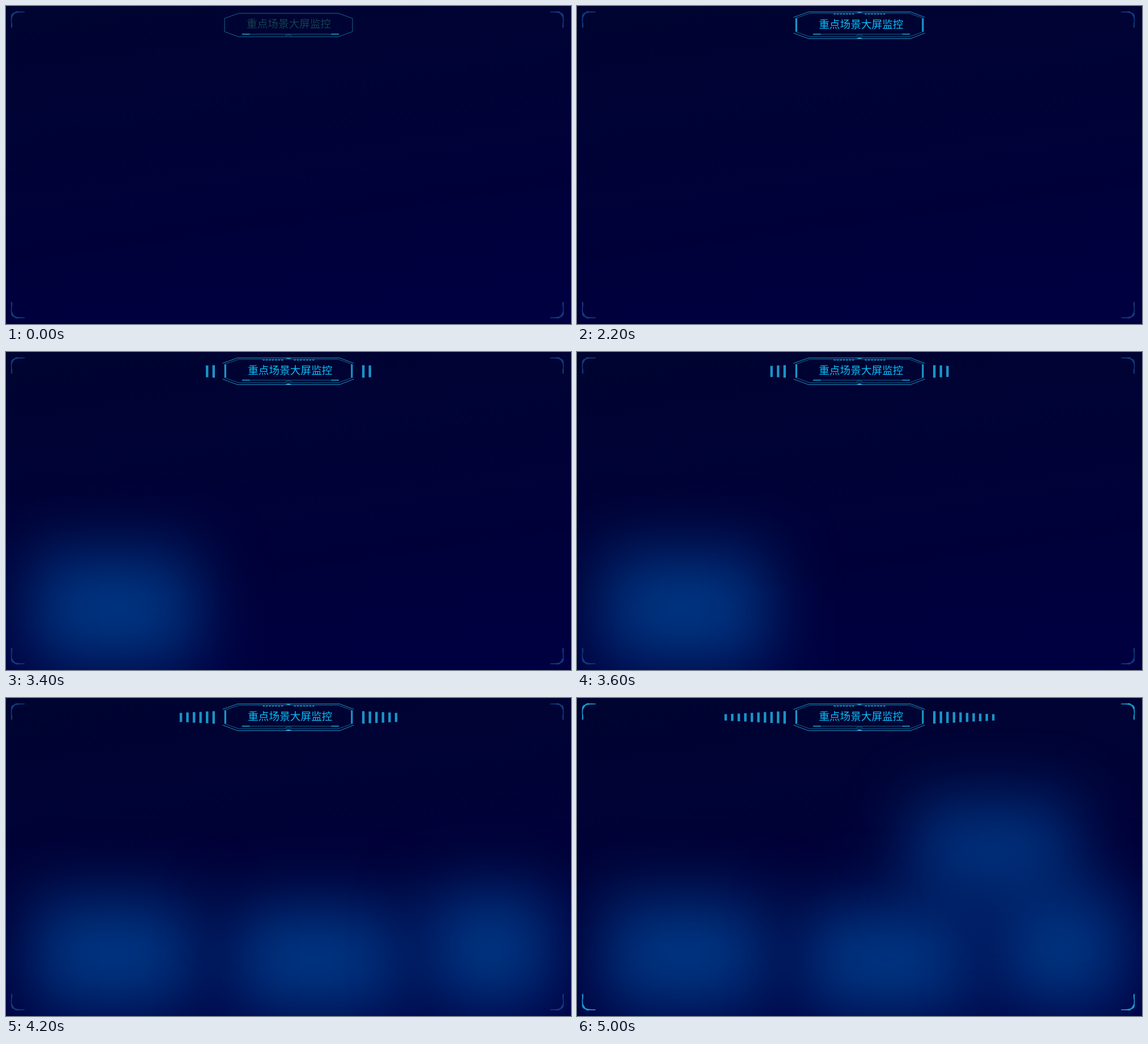
Animation, 998 px wide and 561 px high, one loop 10000 ms. Source, as an HTML page:

```html
<!DOCTYPE html>
<html lang="zh">
<head>
<meta charset="utf-8">
<title>重点场景大屏监控</title>
<style>
  html, body { margin: 0; width: 100%; height: 100%; overflow: hidden; }
  body { background: linear-gradient(172deg, #000430 0%, #000238 50%, #000038 62%, #00003b 68%, #000042 100%); }
  svg { display: block; width: 100%; height: 100%; }
  text { font: 400 18.67px "Noto Sans CJK SC", "Noto Sans CJK", sans-serif; }
  [data-at] { visibility: hidden; }
  .line { fill: none; stroke: #1a7299; stroke-width: .9; }
  .outer { fill: none; stroke: #1d94c6; stroke-width: 1; }
  .solid { fill: #1a94c8; }
  .dash { fill: none; stroke: #1a94c8; stroke-width: 1.7; stroke-dasharray: 3.6 1.8; }
  .glow { fill: #003582; filter: blur(58px); }
  .dim { fill: #10397a; }
</style>
</head>
<body>
<svg viewBox="0 0 998 561" preserveAspectRatio="none">
  <defs>
    <path id="corner" d="M33 9.8 22 9.6 18 9 14.5 11.2 11 13 9 16 8.6 24 9 33 8.7 38 11 38.5 11.3 33 10.3 27 10.6 21 12.5 17.5 14 15 16 13 19 12.2 23 11.5 33 11.2Z"/>
    <g id="corners">
      <use href="#corner"/>
      <use href="#corner" transform="translate(994 0) scale(-1 1)"/>
      <use href="#corner" transform="translate(0 560.5) scale(1 -1)"/>
      <use href="#corner" transform="translate(994 560.5) scale(-1 -1)"/>
    </g>
  </defs>

  <rect class="glow" data-at="3400" x="44" y="355" width="292" height="196"/>
  <rect class="glow" data-at="3800" x="398" y="366" width="300" height="192"/>
  <rect class="glow" data-at="4200" x="742" y="342" width="226" height="202"/>
  <rect class="glow" data-at="5000" x="590" y="180" width="288" height="180" opacity=".92"/>

  <use href="#corners" class="dim" data-until="5000"/>
  <use href="#corners" class="solid" data-at="5000"/>

  <path class="line" d="M386 21.8 411 12.9H587L612 21.8V45.3L587 54.3H411L386 45.3Z M417 49.7H588 M493 52.8Q499 49 505 52.8"/>
  <path class="solid" d="M417 48.7h13.5v1.9H417Z M574.5 48.7H588v1.9H574.5Z"/>

  <g data-at="1000">
    <path class="outer" d="M382.5 20 409 10.4H589L614.5 20 M382.5 47.8 409 57.6H589L614.5 47.8"/>
    <path fill="#35b5e6" d="M493 10.2H505Q499 13.8 493 10.2Z M493 57.9Q499 53.8 505 57.9Z"/>
  </g>
  <path class="solid" data-at="1300" d="M386 22h3v23h-3Z M609.2 22h3v23h-3Z"/>
  <path class="dash" data-at="1600" d="M453.5 14.1H489.5"/>
  <path class="dash" data-at="1900" d="M508.5 14.1H544.5"/>
  <g id="bars" class="solid"></g>

  <text data-until="2200" x="425" y="38.4" fill="#12414f">重点场景大屏监控</text>
  <text data-at="2200" x="427.2" y="39" fill="#0bbdf8">重点场景大屏监控</text>
</svg>
<script>
  const LOOP = 10000;
  const bars = document.getElementById('bars');

  // Ten mirrored pairs spread outwards, each a little shorter.
  for (let i = 0; i < 10; i++) {
    const x = 364.6 - 11.57 * i, y = 23.2 + 0.6 * i, w = 4.4;
    const bottom = 45.2 - 0.6 * i;
    const pair = document.createElementNS('http://www.w3.org/2000/svg', 'path');
    const box = left => `M${left} ${y}h${w}V${bottom}h${-w}Z`;
    pair.setAttribute('d', box(x) + box(998 - x - w));
    pair.dataset.at = 3200 + 200 * i;
    bars.append(pair);
  }

  const parts = [...document.querySelectorAll('[data-at], [data-until]')].map(el => ({
    el,
    from: +(el.dataset.at || 0),
    to: +(el.dataset.until || LOOP)
  }));

  function draw() {
    const t = performance.now() % LOOP;
    for (const { el, from, to } of parts) {
      el.style.visibility = t >= from && t < to ? 'visible' : 'hidden';
    }
    requestAnimationFrame(draw);
  }
  draw();
</script>
</body>
</html>
```
